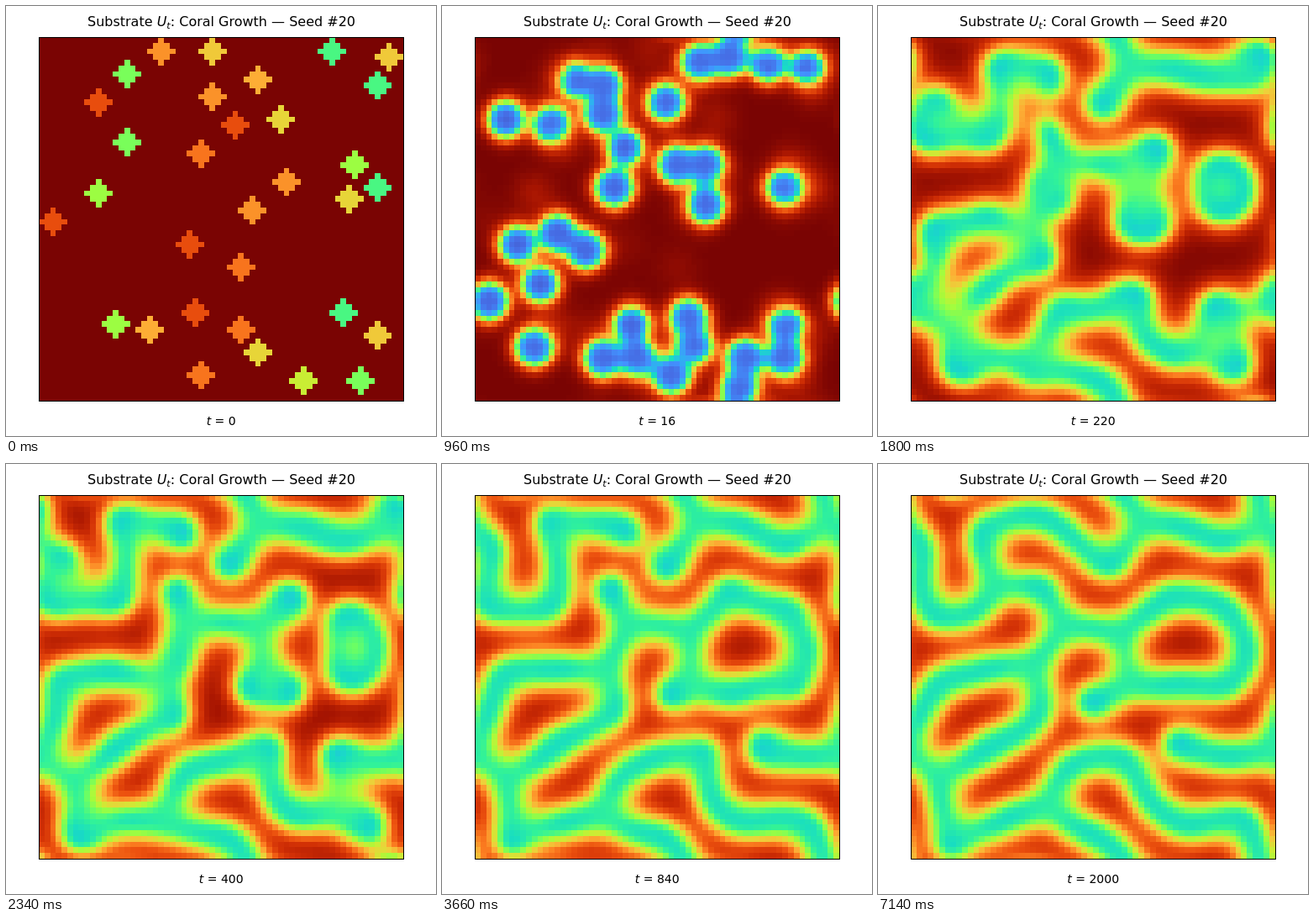
Animation of 512x512 px, one loop 8000 ms. Source, as an HTML page with a canvas:

```html
<!DOCTYPE html>
<html lang="en">
<head>
<meta charset="utf-8">
<title>Coral Growth</title>
<style>
  html, body { margin: 0; width: 100%; height: 100%; overflow: hidden; background: #fff; }
  #stage { position: relative; width: 512px; height: 512px; }
  #field { position: absolute; left: 39px; top: 37px; width: 434px; height: 433px; image-rendering: pixelated; }
  svg { position: absolute; left: 0; top: 0; }
  text { font-family: "DejaVu Sans", sans-serif; text-anchor: middle; white-space: pre; }
  .it { font-style: italic; }
</style>
</head>
<body>
<div id="stage">
  <canvas id="field" width="64" height="64"></canvas>
  <svg width="512" height="512" viewBox="0 0 512 512">
    <rect x="39.5" y="37.5" width="434" height="433" fill="none" stroke="#000"/>
    <text x="256.5" y="24" font-size="16">Substrate <tspan class="it">U</tspan><tspan class="it" font-size="11.2" dy="2.6">t</tspan><tspan dy="-2.6">: Coral Growth — Seed #20</tspan></text>
    <text x="256.2" y="499" font-size="14"><tspan class="it">t</tspan> = <tspan id="step">0</tspan></text>
  </svg>
</div>
<script>
// Gray-Scott reaction-diffusion on a periodic grid
const N = 64, FEED = 0.0545, KILL = 0.062, DU = 0.16, DV = 0.08;
const FRAMES = 120, FRAME_MS = 60, LOOP_MS = 8000;

// seed centres (column, row) grouped by level
const substrate = [
  [0.4, [[51, 2], [59, 8], [59, 26], [53, 48]]],
  [0.45, [[15, 6], [15, 18], [56, 60]]],
  [0.49, [[10, 27], [55, 22], [13, 50]]],
  [0.555, [[46, 60]]],
  [0.61, [[42, 14], [54, 28], [38, 55]]],
  [0.635, [[30, 2], [61, 3], [59, 52]]],
  [0.685, [[38, 7], [19, 51]]],
  [0.72, [[21, 2], [30, 10], [43, 25], [37, 30]]],
  [0.765, [[28, 20], [35, 40], [35, 51], [28, 59]]],
  [0.82, [[10, 11], [34, 15], [2, 32], [26, 36], [27, 48]]]
];
const catalyst = [
  [0.9, [[13, 15]]],
  [0.75, [[44, 3], [22, 8], [22, 13], [35, 22], [24, 26], [54, 26], [37, 49], [10, 54],
    [22, 56], [28, 56], [47, 56], [54, 56], [34, 59]]],
  [0.62, [[39, 4], [51, 4], [33, 11], [40, 22], [40, 29], [14, 34], [19, 37], [2, 46],
    [54, 50], [38, 54], [46, 61]]],
  [0.5, [[58, 5], [17, 7], [5, 14], [26, 19], [7, 36], [11, 43], [27, 50]]]
];

const wrap = i => (i + N) % N;
const clamp = x => Math.min(1, Math.max(0, x));

function seeded(base, groups) {
  const grid = new Float64Array(N * N).fill(base);
  for (const [level, centres] of groups)
    for (const [cx, cy] of centres)
      for (let y = -2; y <= 2; y++)
        for (let x = -2; x <= 2; x++)
          if (x * x + y * y <= 4) grid[wrap(cy + y) * N + wrap(cx + x)] = level;
  return grid;
}

let u = seeded(1, substrate), v = seeded(0, catalyst);
let u2 = new Float64Array(N * N), v2 = new Float64Array(N * N);

function advance() {
  for (let y = 0; y < N; y++) {
    const up = wrap(y - 1) * N, row = y * N, down = wrap(y + 1) * N;
    for (let x = 0; x < N; x++) {
      const l = row + wrap(x - 1), r = row + wrap(x + 1), i = row + x;
      const lap = g => g[up + x] + g[down + x] + g[l] + g[r] - 4 * g[i];
      const a = u[i], b = v[i], react = a * b * b;
      u2[i] = clamp(a + DU * lap(u) - react + FEED * (1 - a));
      v2[i] = clamp(b + DV * lap(v) + react - (FEED + KILL) * b);
    }
  }
  [u, u2, v, v2] = [u2, u, v2, v];
}

// single steps at first, then strides of twenty
const stepAt = i => i <= 20 ? i : (i - 19) * 20;
const history = [];
for (let i = 0, t = 0; i < FRAMES; i++) {
  for (; t < stepAt(i); t++) advance();
  history.push(Float32Array.from(u));
}

// evenly spaced stops from low to high
const stops = ["#30123b", "#4040a2", "#466be3", "#4294ff", "#28bceb", "#18ddc2", "#32f298", "#6dfe62", "#a4fc3c",
  "#cdec34", "#eecf3a", "#fdac34", "#fb7e21", "#eb500e", "#d02f05", "#a91601", "#7a0403"];

function makePalette() {
  const strip = document.createElement("canvas");
  strip.width = 256;
  strip.height = 1;
  const c = strip.getContext("2d");
  const ramp = c.createLinearGradient(0.5, 0, 255.5, 0);
  stops.forEach((color, i) => ramp.addColorStop(i / (stops.length - 1), color));
  c.fillStyle = ramp;
  c.fillRect(0, 0, 256, 1);
  return c.getImageData(0, 0, 256, 1).data;
}
const palette = makePalette();

const ctx = document.getElementById("field").getContext("2d");
const image = ctx.createImageData(N, N);
const label = document.getElementById("step");
let shown = -1;

function draw(i) {
  history[i].forEach((value, k) => {
    const n = Math.min(255, Math.floor(value * 256)) * 4;
    image.data.set(palette.subarray(n, n + 4), k * 4);
  });
  ctx.putImageData(image, 0, 0);
  label.textContent = stepAt(i);
}

const start = performance.now();
function tick(now) {
  const ms = Math.max(0, now - start) % LOOP_MS;
  const i = Math.min(FRAMES - 1, Math.floor(ms / FRAME_MS));
  if (i !== shown) draw(shown = i);
  requestAnimationFrame(tick);
}
draw(0);
requestAnimationFrame(tick);
</script>
</body>
</html>
```
